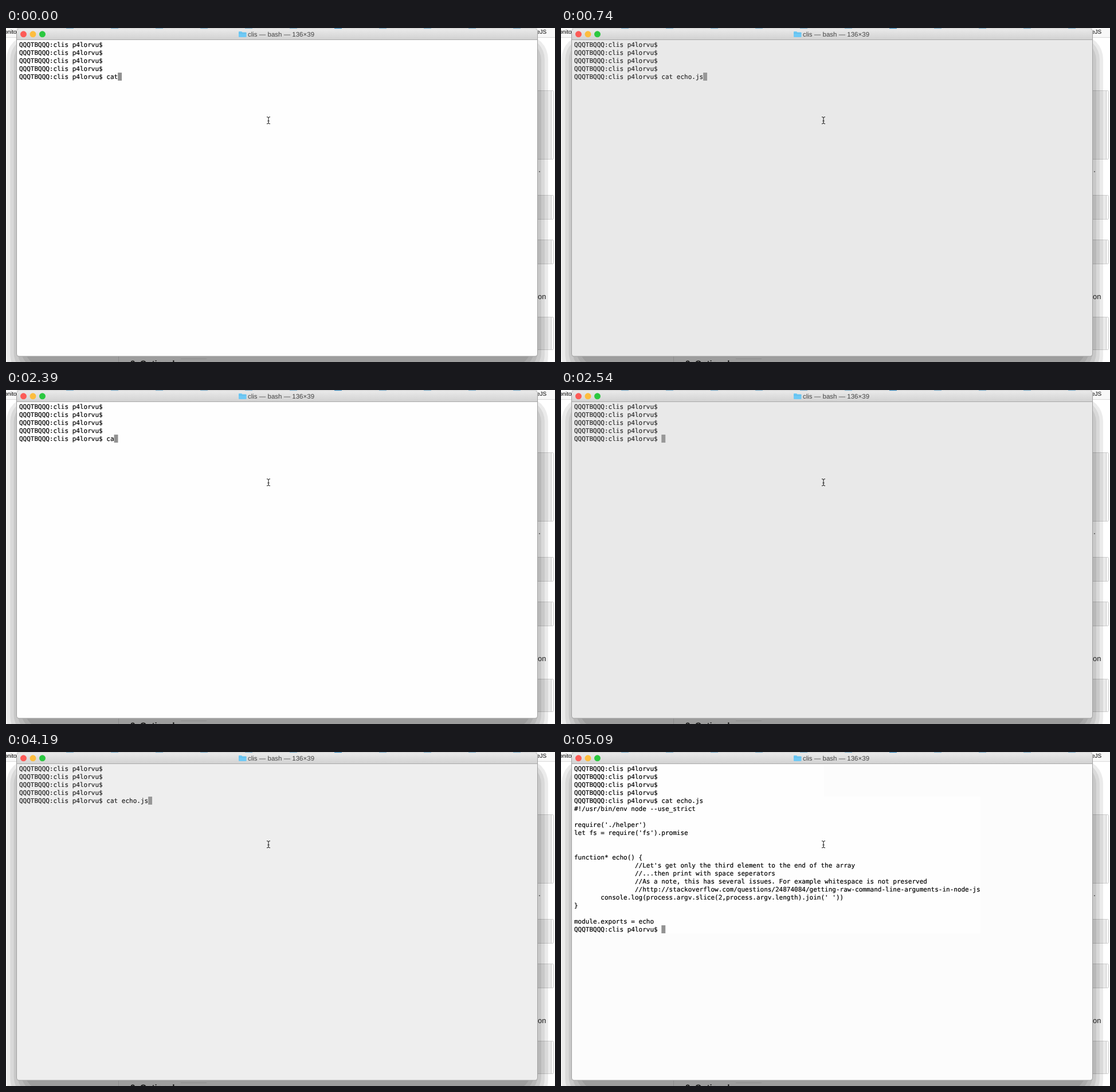
Write an HTML page that moves like this. It is 958x584 px and loops after 8000 ms.

```html
<!DOCTYPE html>
<html lang="en">
<head>
<meta charset="utf-8">
<title>Terminal session</title>
<style>
  html, body { margin: 0; width: 100%; height: 100%; overflow: hidden; background: #fff; }
  svg { display: block; width: 958px; height: 584px; }
  text { font-family: "Liberation Sans", Arial, sans-serif; text-rendering: geometricPrecision; white-space: pre; }
  #lines text { font: 11px "DejaVu Sans Mono", monospace; stroke: #000; stroke-width: .2px; }
</style>
</head>
<body>
<svg viewBox="0 0 958 584">
  <defs>
    <linearGradient id="bar" x2="0" y2="1">
      <stop stop-color="#e9e9e9"/><stop offset="1" stop-color="#d2d2d2"/>
    </linearGradient>
    <g id="panel">
      <path d="M900 .5H954q2 0 2 2V100q0 2-2 2H900Z" fill="#f8f8f8" stroke="#ccc" vector-effect="non-scaling-stroke"/>
    </g>
  </defs>

  <!-- page behind the window -->
  <rect width="958" height="584" fill="#fff"/>
  <g id="panels"></g>
  <path d="M196.5 574V584M305 578.5H350" stroke="#e4e4e4" fill="none"/>
  <text x="925" y="252" font-size="14" fill="#222">..</text>
  <text x="928" y="474" font-size="13" fill="#222">on</text>
  <text x="217" y="592" font-size="15" font-weight="bold" fill="#222">2. Optional</text>
  <g id="shadow" fill-opacity=".08"></g>
  <rect width="958" height="16" fill="#f8f8f8"/>
  <path d="M0 16.5H958" stroke="#d8d8d8"/>
  <text x="-3" y="10" font-size="10">onito</text>
  <text x="926" y="10" font-size="10">eJS</text>
  <g id="bookmarks"></g>

  <!-- window -->
  <path d="M18.5 6q0-4 4-4H923.5q4 0 4 4V570q0 4-4 4H22.5q-4 0-4-4Z" fill="#fefefe" stroke="#a0a0a0"/>
  <path d="M19 20V6q0-4 4-4H923q4 0 4 4V20Z" fill="url(#bar)"/>
  <path d="M19 20.5H927" stroke="#a9a9a9"/>
  <path d="M22 2H924" stroke="#f3f3f3"/>
  <g id="buttons"></g>
  <path d="M406 7q0-1 1-1h4l1.5 1.5h6q1 0 1 1V15q0 1-1 1H407q-1 0-1-1Z" fill="#6fc9f5"/>
  <path d="M406 9H419.5" stroke="#5ab5e3" stroke-width=".8"/>
  <text x="422" y="15" font-size="11.5" fill="#444">clis — bash — 136×39</text>

  <rect id="cursor" width="6.9" height="14" fill="#929292"/>
  <g id="lines"></g>
  <path id="bell" fill="#a9a9a9" fill-rule="evenodd"/>
  <path d="M455 155.5q3 0 3 1.5q0-1.5 3-1.5M458 157V166M455 167.5q3 0 3-1.5q0 1.5 3 1.5M456.5 162.5h3"
        fill="none" stroke="#111"/>
</svg>

<script>
const LOOP = 8000, TICK = 150, CHAR = 6.622, ROW = 14.06, LEFT = 23, BASELINE = 33;
const PROMPT = 'QQQTBQQQ:clis p4lorvu$ ';
const COMMAND = 'cat echo.js';
const INDENT = ' '.repeat(16);
const OUTPUT = [
  '#!/usr/bin/env node --use_strict',
  '',
  "require('./helper')",
  "let fs = require('fs').promise",
  '',
  '',
  'function* echo() {',
  INDENT + "//Let's get only the third element to the end of the array",
  INDENT + '//...then print with space seperators',
  INDENT + '//As a note, this has several issues. For example whitespace is not preserved',
  INDENT + '//http://stackoverflow.com/questions/24874084/getting-raw-command-line-arguments-in-node-js',
  "       console.log(process.argv.slice(2,process.argv.length).join(' '))",
  '}',
  '',
  'module.exports = echo',
  PROMPT
];
const SCREEN = 'M19 21H927V574H19Z';
const REPAINTED = 'M22 24H459V78H732V317H22Z';

// Key moments, in ticks
const COMPLETE = 5, ERASE = 13, EMPTY = 17, RETYPE = 20, COMPLETE_AGAIN = 28, RUN = 34;

// Type, complete with Tab, erase with key repeat, type and complete again.
function typedLength(tick) {
  if (tick < COMPLETE) return Math.min(7, Math.floor(3 + tick * 1.34));
  if (tick < ERASE) return COMMAND.length;
  if (tick < RETYPE) return Math.max(0, 10 - 4 * Math.max(0, tick - ERASE - 1));
  if (tick < COMPLETE_AGAIN) return Math.floor((tick - RETYPE) * 1.25);
  return COMMAND.length;
}

// The visual bell fades evenly; the last one leaves a faint tint.
function bellStrength(tick) {
  const rung = [COMPLETE, EMPTY, COMPLETE_AGAIN - .5].findLast(start => start <= tick);
  const rest = tick > COMPLETE_AGAIN ? .02 : 0;
  return rung === undefined ? 0 : Math.max(rest, .25 - .12 * (tick - rung));
}

const $ = id => document.getElementById(id);
function add(parent, tag, attrs, content = '') {
  const node = document.createElementNS('http://www.w3.org/2000/svg', tag);
  for (const key in attrs) node.setAttribute(key, attrs[key]);
  node.textContent = content;
  $(parent).append(node);
  return node;
}

function addPanel(y, height) {
  add('panels', 'rect', { x: 900.5, y: y - .5, width: 55, height, rx: 2, fill: '#fafafa', stroke: '#ccc' });
  add('panels', 'rect', { x: 900.5, y: y - .5, width: 51, height, fill: '#ebebeb', stroke: '#ccc' });
}
addPanel(110, 120);
addPanel(293, 42);
addPanel(371, 42);
addPanel(506, 57);

for (let i = 0; i < 6; i++) {
  const x = 1 + 6.3 * i, y = 12 + 3 * i;
  add('shadow', 'rect', { x, y, width: 946 - 6 * i - x, height: 616 - 5 * i - y, rx: 42 - 2 * i });
}
add('bookmarks', 'rect', { x: 19, width: 908, height: 2, fill: '#dcdcdc' });
for (let i = 0; i < 11; i++)
  add('bookmarks', 'rect', { x: 105 + 78 * i, width: 13, height: 1.6, fill: i === 6 ? '#3b8fc4' : '#86b4d0' });
['#fc5b57', '#fdbd3e', '#2bc840'].forEach((fill, i) =>
  add('buttons', 'circle', { cx: 30.5 + 16.5 * i, cy: 10.8, r: 5.5, fill }));

const rows = Array.from({ length: 5 + OUTPUT.length }, (_, i) =>
  add('lines', 'text', { x: LEFT, y: BASELINE + i * ROW }, i < 5 ? PROMPT : ''));

let shownTick = -1;
function draw() {
  const tick = Math.floor((performance.now() % LOOP + 10) / TICK);
  if (tick !== shownTick) {
    shownTick = tick;
    const done = tick >= RUN;
    const typed = typedLength(tick);
    const column = PROMPT.length + (done ? 0 : typed);
    const row = done ? rows.length - 1 : 4;
    rows[4].textContent = PROMPT + COMMAND.slice(0, typed);
    OUTPUT.forEach((line, i) => rows[5 + i].textContent = done ? line : '');
    $('cursor').setAttribute('x', LEFT + column * CHAR);
    $('cursor').setAttribute('y', BASELINE - 11.2 + row * ROW);
    $('bell').setAttribute('d', SCREEN + (done ? REPAINTED : ''));
    $('bell').setAttribute('fill-opacity', bellStrength(tick));
  }
  requestAnimationFrame(draw);
}
draw();
</script>
</body>
</html>
```
